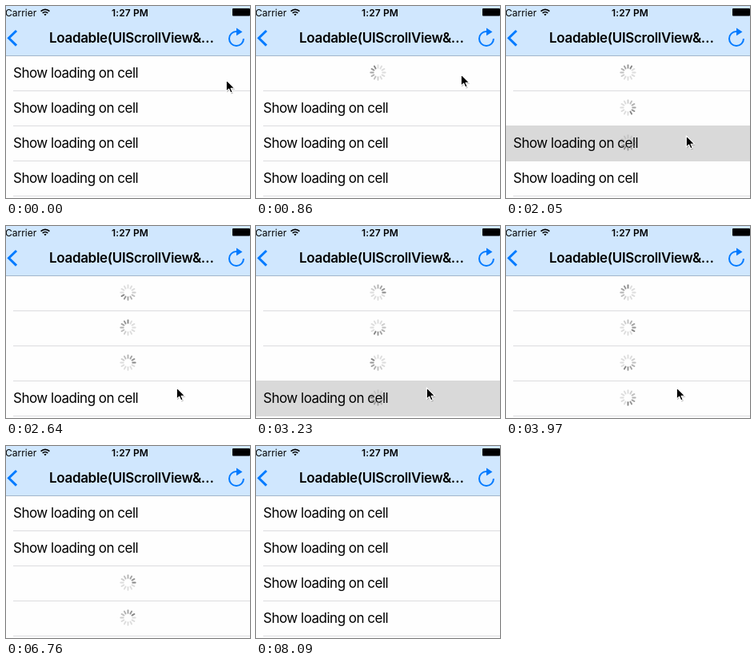
An HTML page that plays this animation: 305x241 px, repeating every 9080 ms.

```html
<!DOCTYPE html>
<html lang="en">
<head>
<meta charset="utf-8">
<title>Loading cells</title>
<style>
  html, body { margin: 0; width: 100%; height: 100%; overflow: hidden; background: #fefefe; }
  svg { display: block; width: 100vw; height: 100vh; }
  text { font-family: Inter, Roboto, "Liberation Sans", sans-serif; fill: #000; }
  .label { font-size: 17px; letter-spacing: -.5px; }
  .title { font-size: 17px; font-weight: 600; letter-spacing: -.33px; }
  .status { font-size: 12px; }
</style>
</head>
<body>
<svg viewBox="0 0 305 241">
  <rect width="305" height="241" fill="#fefefe"/>
  <g id="rows"></g>

  <rect width="305" height="62" fill="#d0e7fe"/>
  <rect y="62" width="305" height="1" fill="#a3b6ca"/>
  <text class="status" x="-1" y="12.5">Carrier</text>
  <g fill="none" stroke="#000" stroke-width="1.7">
    <path d="M43.6 6.7a7.6 7.6 0 0 1 10.8 0M45.7 9a4.7 4.7 0 0 1 6.6 0"/>
    <path d="M49 12.3l-1.6-1.8a2.4 2.4 0 0 1 3.2 0z" fill="#000" stroke="none"/>
  </g>
  <text class="status" x="132" y="12.5" font-weight="600" letter-spacing=".12">1:27 PM</text>
  <rect x="283" y="3" width="22" height="9.5" rx="1" fill="#000"/>
  <path d="M13 31L3.5 40.3L13 49.6" fill="none" stroke="#007aff" stroke-width="3"/>
  <text class="title" x="54" y="46">Loadable(UIScrollView&amp;…</text>
  <path d="M297 41A9 9 0 1 1 288 32" fill="none" stroke="#007aff" stroke-width="2"/>
  <path d="M288 27.5L295.5 32.4L288 37.3z" fill="#007aff"/>

  <g id="cursor" stroke-linejoin="round">
    <path d="M1 1v14.6l3.4-3 2.1 4.9 2.5-1-2-4.8h4.4z" fill="#000" opacity=".25"/>
    <path d="M.3 -.2v14.4l3.3-3.1 2.2 4.9 2.4-1-2.1-4.8h4.5z" fill="#000" stroke="#fff" stroke-width="1.1"/>
  </g>
</svg>
<script>
const LOOP = 9080, TAP = 140, SPOKES = 12;

// Loading span of each row in ms, and where its spinner begins.
const rows = [
  { start: 710, end: 5285, phase: 13 },
  { start: 1298, end: 6165, phase: 5 },
  { start: 2035, end: 6755, phase: 8 },
  { start: 3215, end: 8085, phase: 7 }
];

// Pointer stops: time, x, y.
const stops = [
  [0, 275, 93], [435, 256, 86], [860, 256, 86], [1152, 240, 124], [1450, 240, 124],
  [1742, 225, 163], [2185, 225, 163], [2628, 213, 203], [5728, 213, 203], [6023, 265, 220]
];
const POINTER_END = 6100;

function add(parent, tag, attrs, text) {
  const node = document.createElementNS('http://www.w3.org/2000/svg', tag);
  for (const name in attrs) node.setAttribute(name, attrs[name]);
  if (text) node.textContent = text;
  return parent.appendChild(node);
}

const list = document.getElementById('rows');
const cursor = document.getElementById('cursor');

rows.forEach((row, i) => {
  add(list, 'rect', { x: 9, y: 106 + 44 * i, width: 296, height: 1, fill: '#dcdcdf' });
});
rows.forEach((row, i) => {
  const y = 62 + 44 * i;
  row.highlight = add(list, 'rect', { y, width: 305, height: 45, fill: '#d9d9d9' });
  row.label = add(list, 'text', { class: 'label', x: 9, y: y + 28 }, 'Show loading on cell');
  row.spinner = add(list, 'g', { transform: `translate(152.5 ${y + 21.5})` });
  row.spokes = Array.from({ length: SPOKES }, (_, k) => add(row.spinner, 'line', {
    y1: -5.8, y2: -9.2, stroke: '#888', 'stroke-width': 1.9,
    'stroke-linecap': 'round', transform: `rotate(${k * 360 / SPOKES})`
  }));
});

function show(node, visible) {
  node.setAttribute('visibility', visible ? 'visible' : 'hidden');
}

// The screen refreshes in even steps, with a slower beat after the first tap.
function quantize(t) {
  return t < 710 ? Math.floor(t / 145) * 145 : 710 + Math.floor((t - 710) / 147.6) * 147.6;
}

function pointerAt(now) {
  const next = stops.findIndex(stop => stop[0] > now);
  if (next < 0) return stops[stops.length - 1].slice(1);
  const [t0, x0, y0] = stops[next - 1], [t1, x1, y1] = stops[next];
  const p = (now - t0) / (t1 - t0);
  return [Math.round(x0 + (x1 - x0) * p), Math.round(y0 + (y1 - y0) * p)];
}

function drawRow(row, now) {
  const loading = now >= row.start && now < row.end;
  const tapped = loading && now < row.start + TAP;
  show(row.highlight, tapped);
  show(row.label, !loading || tapped);
  show(row.spinner, loading);
  const lead = Math.floor(now * SPOKES / 1000 + row.phase);
  row.spokes.forEach((spoke, k) => {
    const age = ((lead - k) % SPOKES + SPOKES) % SPOKES;
    spoke.setAttribute('opacity', Math.max(.27, 1 - age * .12));
  });
}

function draw(t) {
  const now = quantize(t);
  rows.forEach(row => drawRow(row, now));
  show(cursor, now < POINTER_END);
  cursor.setAttribute('transform', `translate(${pointerAt(now)})`);
}

function tick() {
  draw(performance.now() % LOOP);
  requestAnimationFrame(tick);
}
tick();
</script>
</body>
</html>
```
